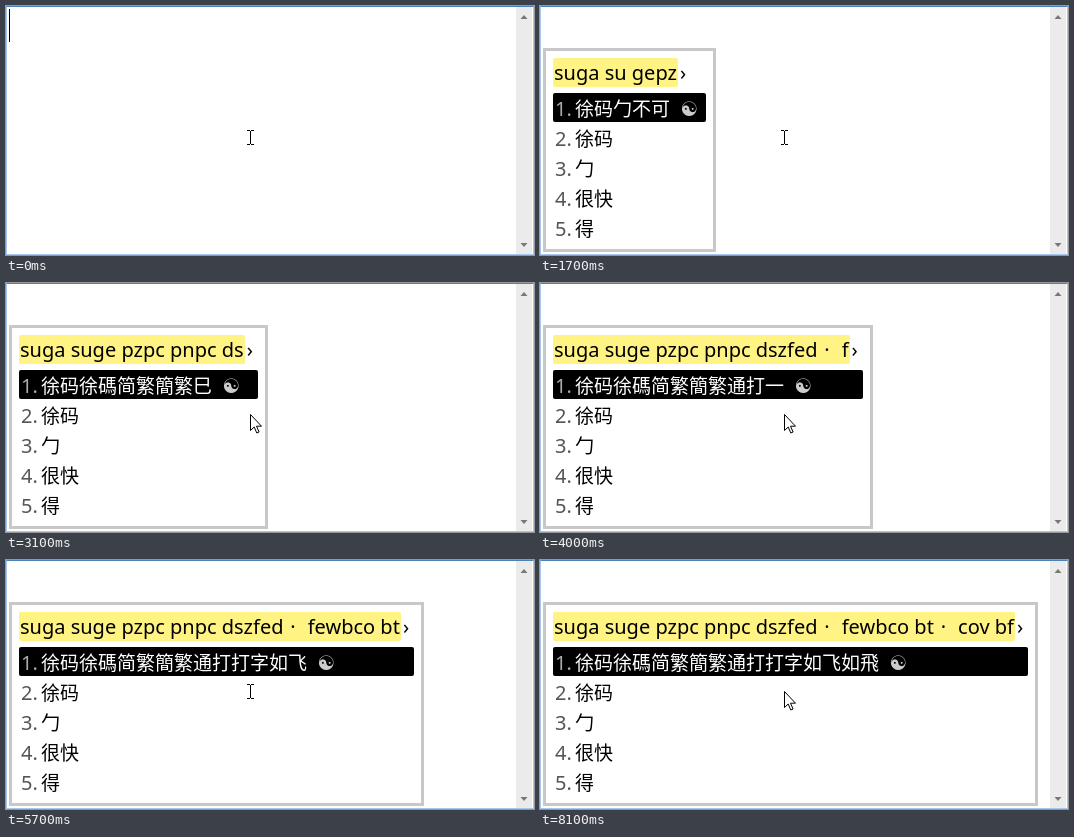
An HTML page for the animation above (8300 ms loop, 528 px wide and 249 px high).

```html
<!DOCTYPE html>
<html lang="zh-CN">
<head>
<meta charset="utf-8">
<style>
html, body { margin: 0; width: 100%; height: 100%; overflow: hidden; background: #fff; }
#edit {
  position: absolute; inset: 0; box-sizing: border-box;
  border: 1px solid #a6c8ee; border-top-color: #4a80bd; background: #fff;
}
svg { position: absolute; left: 0; top: 0; }
#caret { position: absolute; left: 3px; top: 3px; width: 1px; height: 33px; background: #000; }
#menu {
  position: absolute; left: 3px; top: 42px; box-sizing: border-box;
  min-width: 160px; padding: 7px; border: 3px solid #c8c8c8; background: #fff;
  font: 20px/29px "Noto Sans", sans-serif; color: #000; white-space: pre;
}
#menu div { height: 29px; }
#head { margin-bottom: 6px; }
#code { display: inline-block; height: 29px; padding: 0 1px; border-radius: 2px; background: #fff383; }
#code i { display: inline-block; width: 19px; text-align: center; font-style: normal; }
#more { display: inline-block; width: 11px; padding-left: 2px; }
.row { padding-left: 2px; margin-bottom: 1px; }
.row:last-child { margin-bottom: 0; }
.row b { display: inline-block; width: 20px; font-weight: normal; color: #555; }
.row span { font-family: "Noto Sans CJK SC", "Noto Sans CJK", sans-serif; font-size: 19px; }
.row em {
  display: inline-block; width: 19px; margin: 0 7px 0 10px; text-align: center;
  font: 20px/20px "DejaVu Sans", sans-serif; color: #ccc;
}
.row:nth-child(2) { background: #000; color: #fff; border-radius: 2px; }
.row:nth-child(2) b { color: #aaa; }
</style>
</head>
<body>
<div id="edit"></div>
<div id="caret"></div>
<div id="menu"></div>
<svg width="528" height="249">
  <rect x="510" y="1" width="16" height="247" fill="#ebebeb"/>
  <path d="M514.5 13h7l-3.5-4zM514.5 237h7l-3.5 4z" fill="#777"/>
  <path id="beam" d="M241 124.5h3m1 0h3M244.5 125v13M241 138.5h3m1 0h3" stroke="#000" fill="none" shape-rendering="crispEdges"/>
  <path id="arrow" d="M244.5 131.5v16l3.7-3.5 2.6 6 2.3-1-2.6-5.8h5z" stroke="#000" fill="#fff"/>
</svg>
<script>
const LOOP = 8300;
const $ = id => document.getElementById(id);

const WORDS = ['徐码', '勹', '很快', '得'];
const A = 'suga su gepz ', B = 'suga suge pzpc pnp', C = B + 'c dszfed', D = C + '· fewb', E = D + 'co bt';
const P = '徐码勹不可', Q = '徐码徐碼简繁簡繁', R = Q + '通打', S = R + '打字', T = S + '如飞';

// [time, typed code, composed sentence]
const steps = [
  [100, 's'], [300, 'su'], [400, 'sug'], [600, 'suga'],
  [800, 'suga s', '徐码得'], [900, 'suga su', '徐码勹'],
  [1100, 'suga sug', '徐码很快'], [1200, 'suga suge', '徐码徐碼'],
  [1300, 'suga suge p', '徐码徐碼不'], [1500, 'suga su gepz', P],
  [1800, A + 'p', P + '不'], [2000, A + 'pc', P + '知论'],
  [2300, A + 'pcp', P + '知论不'], [2400, A + 'pcpn', P + '知论箵'],
  [2600, B, '徐码徐碼简繁簡'], [2800, B + 'c', Q],
  [2900, B + 'c d', Q + '大'], [3100, B + 'c ds', Q + '巳'],
  [3300, B + 'c dsz', Q + '通'], [3400, B + 'c dszf', Q + '通一'],
  [3600, B + 'c dszfe', R], [3800, C, R], [3900, C + '·', R],
  [4000, C + '· f', R + '一'], [4100, C + '· fe', R + '打'],
  [4300, C + '· few', R + '打'], [4500, D, S],
  [5100, D + 'c', S + '女'], [5200, D + 'co', S + '如'],
  [5400, D + 'co b', S + '如不'], [5500, E, T],
  [6000, E + '·', T], [6100, E + '· c', T + '女'],
  [6300, E + '· co', T + '如'], [6700, E + '· cov', T + '如'],
  [6900, E + '· cov b', T + '如飞'], [7100, E + '· cov bf', T + '如飛']
];

// Times at which each one flips
const caretFlips = [600, 1100, 1600, 3200, 3700, 4200, 4700, 5200, 5700, 6200, 6700, 7200, 7700];
const arrowFlips = [2900, 4300, 6000, 7700, 8100];

const flipped = (flips, t) => flips.filter(f => f <= t).length % 2 === 1;
const show = (el, on) => el.style.visibility = on ? 'visible' : 'hidden';

function rowsFor(code, sentence) {
  if (sentence) return [sentence + '<em>☯</em>', ...WORDS];
  return WORDS.slice([3, 1, 1, 0][code.length - 1]);
}

function drawMenu([, code, sentence]) {
  const rows = rowsFor(code, sentence).map((w, i) =>
    `<div class="row"><b>${i + 1}.</b><span>${w}</span></div>`);
  $('menu').innerHTML =
    `<div id="head"><span id="code">${code.replace(/·/g, '<i>·</i>')}</span><span id="more">›</span></div>` +
    rows.join('');
}

let last;
function frame() {
  const t = performance.now() % LOOP;
  const step = steps.filter(s => s[0] <= t).pop();
  const arrow = flipped(arrowFlips, t);
  if (step && step !== last) drawMenu(step);
  last = step;
  show($('menu'), step);
  show($('caret'), !flipped(caretFlips, t));
  show($('arrow'), arrow);
  show($('beam'), !arrow);
  requestAnimationFrame(frame);
}
frame();
</script>
</body>
</html>
```
